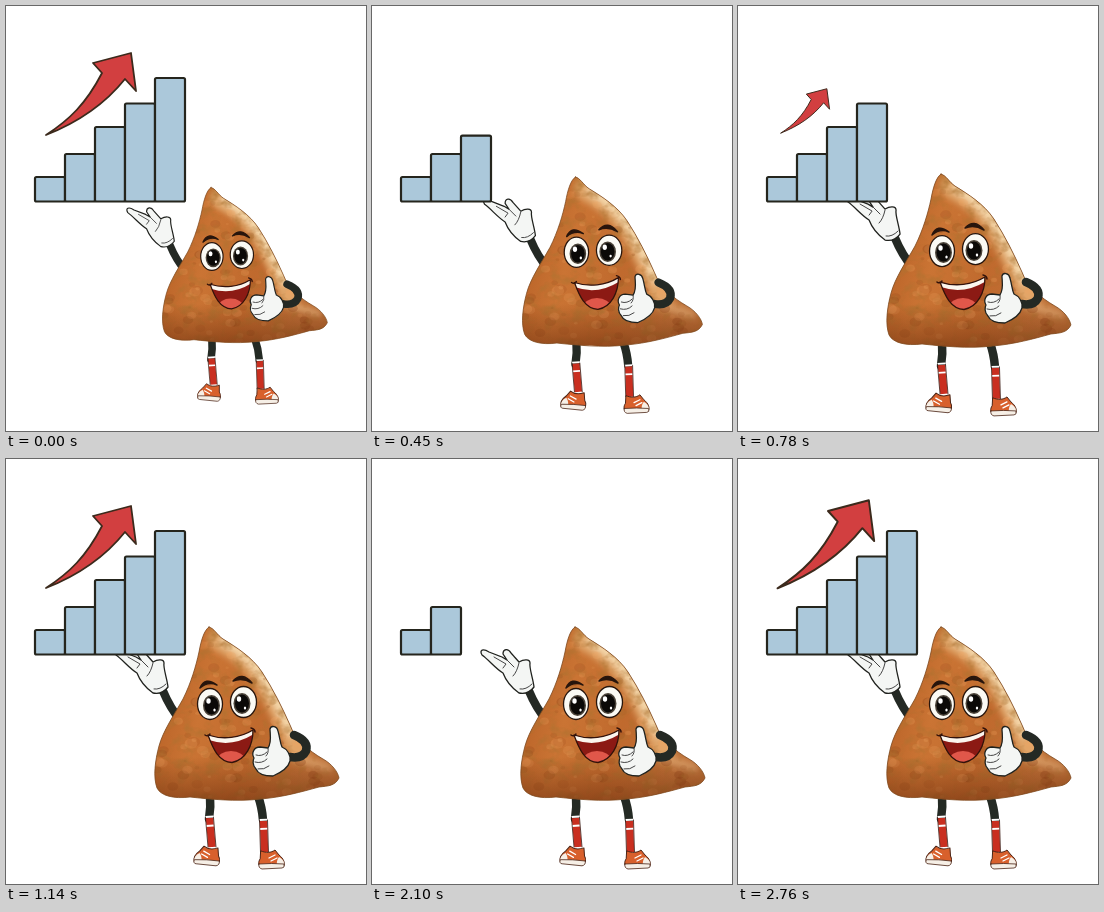
Animation of 360x425 px, one loop 2790 ms. Source, as an HTML page:

```html
<!DOCTYPE html>
<html lang="en">
<head>
<meta charset="utf-8">
<title>Samosa growth chart</title>
<style>
  html, body { margin: 0; width: 100%; height: 100%; overflow: hidden; background: #fff; }
  svg { display: block; width: 360px; height: 425px; }
</style>
</head>
<body>
<svg viewBox="0 0 360 425" stroke-linecap="round" stroke-linejoin="round">
  <defs>
    <linearGradient id="crust" x1="0" y1="0" x2="1" y2="0.25">
      <stop offset="0" stop-color="#b05a22"/>
      <stop offset=".35" stop-color="#ca7434"/>
      <stop offset=".65" stop-color="#c06a2e"/>
      <stop offset="1" stop-color="#bd7038"/>
    </linearGradient>
    <linearGradient id="shade" x1="0" y1="0" x2="0" y2="1">
      <stop offset=".75" stop-color="#6b2c0c" stop-opacity="0"/>
      <stop offset="1" stop-color="#6b2c0c" stop-opacity=".55"/>
    </linearGradient>
    <filter id="soft" x="-30%" y="-30%" width="160%" height="160%"><feGaussianBlur stdDeviation="3"/></filter>
    <filter id="grain" x="0" y="0" width="1" height="1">
      <feTurbulence type="fractalNoise" baseFrequency=".07 .09" numOctaves="3" seed="4"/>
      <feColorMatrix values="0 0 0 0 .42  0 0 0 0 .17  0 0 0 0 .03  2.6 0 0 0 -1.2"/>
    </filter>
    <path id="body" d="M203 168C208 169 211 176 217 180C230 188 246 198 256 213C267 230 276 248 284 266C289 280 303 292 317 300C326 305 332 313 333 319C329 327 322 327 313 328C295 333 277 338 255 340C230 343 203 340 184 338C168 340 155 337 151 329C147 318 149 302 153 287C157 272 168 256 177 240C185 224 190 207 193 193C195 182 198 171 203 168Z"/>
    <path id="mouth" d="M202 276C217 281 234 279 247 271C247 286 240 301 226 303.500C213 303 207 290 202 276Z"/>
    <clipPath id="inside"><use href="#body"/></clipPath>
    <clipPath id="lips"><use href="#mouth"/></clipPath>
    <g id="shoe">
      <path d="M2 1C7 3 12 3 16 0L20 5C25 9 26 13 25 16L3 18C-1 16 -1 12 1 9Z" fill="#d8602c" stroke="#4a2416"/>
      <path d="M20 7Q26 10 25 16L18 16Q17 11 20 7Z" fill="#f6efe6"/>
      <path d="M0 14Q13 13 25 14Q26 18 23 18L3 19Q-1 18 0 14Z" fill="#f6efe6" stroke="#4a2416" stroke-width=".8"/>
      <path d="M10 8l6-3M12 11l6-3" stroke="#fff" stroke-width="1.300"/>
    </g>
  </defs>

  <g id="samosa">
    <g fill="none">
      <path d="M204 337Q205 348 203 360M252 337Q256 348 257 361" stroke="#242a24" stroke-width="8.500"/>
      <path d="M203.500 359L206 388M257.500 362L258.500 393" stroke="#c92f20" stroke-width="7.500" stroke-linecap="butt"/>
      <path d="M199.500 358l8-.5M199.800 367l8-.5M253.500 361l8-.3M253.700 370l8-.3" stroke="#fff" stroke-width="1.800" stroke-linecap="butt"/>
      <path d="M199.500 358.500L202 388M207.500 358.500L210 388M253.500 361L254.500 393M261.500 361L262.500 393" stroke="#3a1a12" stroke-width=".8"/>
      <path d="M175 262Q164 249 157 232" stroke="#242924" stroke-width="8.500"/>
    </g>
    <use href="#shoe" transform="matrix(-1 0 0 1 214 388) rotate(-3)"/>
    <use href="#shoe" transform="translate(253 391)"/>
    <path d="M147 234C140 229 134 222 131 214C123 209 117 201 110 196C107 191 111 189 117 193L130 198L135 201L131 195C131 190 136 189 139 194L147 203C152 200 158 200 158 204C157 209 161 219 162 228Q156 236 147 234Z" fill="#f4f6f4" stroke="#20221e" stroke-width="1.300"/>
    <path d="M122 198L134 205L131 209M135 201L142 208M141 217Q145 213 147 204M148 230Q154 231 160 225" fill="none" stroke="#444" stroke-width="1"/>

    <use href="#body" fill="url(#crust)"/>
    <g clip-path="url(#inside)">
      <g fill="none" filter="url(#soft)">
        <path d="M214 180Q245 196 262 226T292 288" stroke="#dfa468" stroke-width="24"/>
        <path d="M220 182Q248 198 263 226T286 273" stroke="#f6d9ac" stroke-width="10"/>
        <path d="M290 300Q306 303 322 309" stroke="#dda067" stroke-width="8"/>
      </g>
      <g id="spots"></g>
      <rect x="145" y="165" width="190" height="180" filter="url(#grain)" opacity=".75"/>
      <use href="#body" fill="url(#shade)"/>
    </g>
    <use href="#body" fill="none" stroke="#7d4a20" stroke-width=".8"/>

    <path d="M194 229Q199 217 211 226Q202 222 194 229ZM227 222Q236 212 246 224Q236 218 227 222Z" fill="#28150c" stroke="#28150c" stroke-width="1.500"/>
    <g id="eyes"></g>
    <use href="#mouth" fill="#8c1a14"/>
    <g clip-path="url(#lips)">
      <path d="M200 270H248V275Q226 289 203 281Z" fill="#fbf6ee"/>
      <ellipse cx="225" cy="301" rx="14" ry="9" fill="#e0574a"/>
    </g>
    <use href="#mouth" fill="none" stroke="#32120a" stroke-width="1.300"/>
    <path d="M199 276Q202 278 204 275M245 269Q249 270 249 273" fill="none" stroke="#32120a" stroke-width="1.500"/>

    <path d="M288 276Q303 282 300 292Q296 300 284 298" fill="none" stroke="#242924" stroke-width="8.500"/>
    <path d="M262 289C266 283 264 275 264 270C265 266 271 267 272 272C274 279 274 284 276 288C281 290 285 296 284 302C282 310 274 314 267 317C259 317 252 315 250 310C246 306 247 301 248 299C245 294 248 288 254 288Z" fill="#f4f6f4" stroke="#20221e" stroke-width="1.300"/>
    <path d="M250 296Q256 298 261 293M249 303Q256 305 261 300M252 310Q258 311 263 307M262 289Q263 294 260 297" fill="none" stroke="#444" stroke-width="1"/>
  </g>

  <g id="bars" fill="#abc8da" stroke="#25251d" stroke-width="2.200"></g>
  <path id="arrow" d="M40 129C63 114 80 98 96 67L87 57L125 47L130 85L119 73C99 98 73 116 40 129Z" fill="#d23f40" stroke="#3b2a1c" stroke-width="1.800"/>
</svg>
<script>
const LOOP = 2790, STEP = 30, BASE = 195.5, TOPS = [171, 148, 121, 97.5, 72];
const $ = id => document.getElementById(id);

function add(parent, tag, attrs) {
  const node = document.createElementNS('http://www.w3.org/2000/svg', tag);
  for (const key in attrs) node.setAttribute(key, attrs[key]);
  return parent.appendChild(node);
}

let seed = 7;
const random = () => (seed = seed * 16807 % 2147483647) / 2147483647;

// Crust blisters, light and dark
for (let i = 0; i < 150; i++) {
  const size = 1 + random() * 4;
  add($('spots'), 'ellipse', {
    cx: 148 + random() * 180, cy: 185 + random() * 155, rx: size * 1.3, ry: size,
    fill: i % 2 ? '#eda562' : '#8a4116', opacity: 0.12 + random() * 0.2
  });
}

for (const [x, y, rx, pupil] of [[204, 245, 12.5, 205.5], [237.5, 243, 13, 236]]) {
  const oval = (cx, cy, rx, ry, fill, stroke = 'none') =>
    add($('eyes'), 'ellipse', { cx, cy, rx, ry, fill, stroke, 'stroke-width': 1.3 });
  oval(x, y, rx, 15.5, '#fbfaf4', '#28150c');
  oval(pupil, y + 1.5, 8.5, 10.5, '#4a4238');
  oval(pupil, y + 1.5, 7, 9, '#0b0907');
  oval(pupil - 3, y - 3, 2.2, 2.8, '#fff');
  oval(pupil + 3, y + 6, 1.2, 1.5, '#fff');
}

const bars = TOPS.map((_, i) => add($('bars'), 'rect', { x: 29 + 30 * i, width: 30, rx: 1.5 }));

const clamp = p => Math.min(1, Math.max(0, p));
const backOut = p => 1 + 2.7 * (p - 1) ** 3 + 1.7 * (p - 1) ** 2;
const grow = (time, start, duration) =>
  time <= start ? 0 : backOut(clamp((time - start) / duration));

function scaleAbout(node, x, y, s) {
  node.setAttribute('transform', `translate(${x} ${y}) scale(${s}) translate(${-x} ${-y})`);
}

function draw(t) {
  scaleAbout($('samosa'), 222, 297, 1 - 0.105 * (1 - clamp(t / 850)) ** 2);

  // The chart starts complete, then builds twice
  const time = t < 30 ? Infinity : t < 1800 ? t - 60 : t - 1800;
  bars.forEach((bar, i) => {
    const height = (BASE - TOPS[i]) * grow(time, 180 * i, 105);
    bar.setAttribute('y', BASE - height);
    bar.setAttribute('height', height);
    bar.style.display = height > 0 ? '' : 'none';
  });
  const size = grow(time, 662, 414);
  scaleAbout($('arrow'), 46.4, 124.7, size);
  $('arrow').style.display = size > 0 ? '' : 'none';
}

const begin = performance.now();
function tick() {
  const t = (performance.now() - begin) % LOOP;
  draw(t - t % STEP);
  requestAnimationFrame(tick);
}
tick();
</script>
</body>
</html>
```
